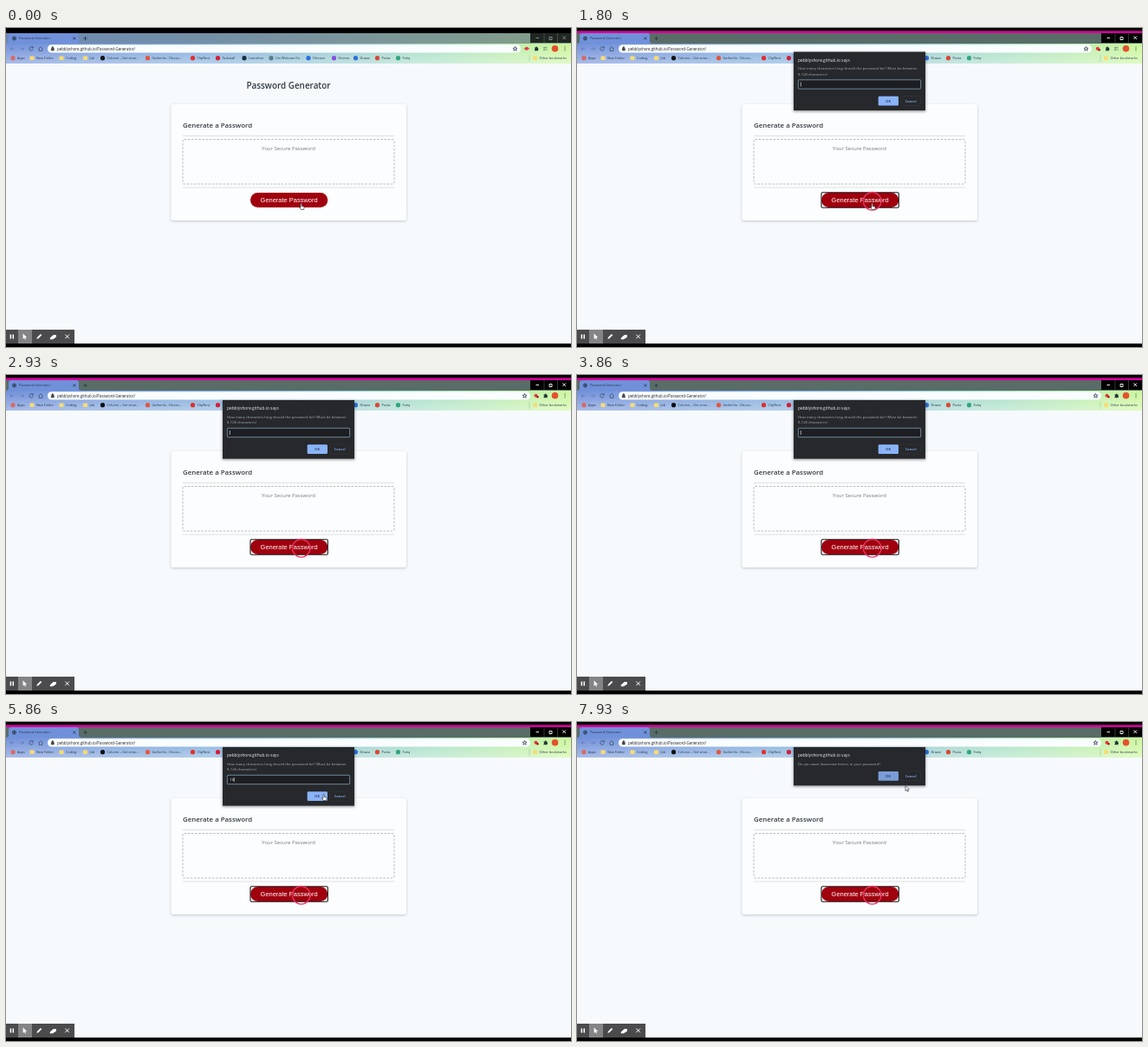
An HTML page that plays this animation: 652x368 px, repeating every 8000 ms.

```html
<!DOCTYPE html>
<html lang="en">
<head>
<meta charset="utf-8">
<title>Password Generator</title>
<style>
  html, body { margin: 0; width: 100%; height: 100%; overflow: hidden; background: #000; }
  svg { display: block; width: 652px; height: 368px; font-family: "Open Sans", "Noto Sans", sans-serif; }
  .mid { text-anchor: middle; }
  .line { fill: none; stroke: #26384a; stroke-width: .8; }
  .pale { fill: none; stroke: #fff; stroke-width: 1; }
  .chrome { font-size: 3.8px; fill: #26394a; }
  .msg { font-size: 4.19px; fill: #a7abb0; }
  .btn { font-size: 4px; font-weight: 600; text-anchor: middle; }
</style>
</head>
<body>
<svg viewBox="0 0 652 368">
  <defs>
    <linearGradient id="theme">
      <stop offset="0" stop-color="#708fda"/><stop offset=".4" stop-color="#84b2dc"/>
      <stop offset=".75" stop-color="#a8e0c6"/><stop offset="1" stop-color="#cdf79c"/>
    </linearGradient>
    <linearGradient id="haze" x2="0" y2="1">
      <stop offset="0" stop-color="#fff" stop-opacity="0"/><stop offset="1" stop-color="#fff" stop-opacity=".4"/>
    </linearGradient>
    <linearGradient id="idle">
      <stop offset="0" stop-color="#6c88b6"/><stop offset=".5" stop-color="#7892a0"/><stop offset="1" stop-color="#829f88"/>
    </linearGradient>
    <filter id="soft" x="-5%" y="-5%" width="110%" height="115%"><feGaussianBlur stdDeviation="1.5"/></filter>
  </defs>

  <!-- browser frame -->
  <rect width="652" height="368"/>
  <rect id="accent" y="3.3" width="652" height="2.7" fill="#d4009a"/>
  <rect id="strip" y="6" width="652" height="12"/>
  <rect y="18" width="652" height="23" fill="url(#theme)"/>
  <rect y="18" width="652" height="23" fill="url(#haze)"/>
  <path d="M0 18Q3 18 3 15V9Q3 6 6 6H81Q84 6 84 9V15Q84 18 87 18Z" fill="#7090da"/>
  <circle cx="9.5" cy="12" r="2" class="line"/><path d="M7.5 12h4M9.5 10v4" class="line" stroke-width=".4"/>
  <text x="15" y="13.4" class="chrome">Password Generator</text>
  <path d="M77.3 10.5l3 3m0-3l-3 3M89.3 12h4.4M91.5 9.8v4.4" class="line"/>
  <g id="controls">
    <rect x="605" y="6" width="47" height="11"/>
    <path d="M621 6v11M636.5 6v11" stroke="#3c4446" stroke-width=".8"/>
    <path id="controlMarks" d="M611.5 11.5h3.5M627 10.5h3v3h-3zM642.5 9.5l3.5 3.5m0-3.5l-3.5 3.5" fill="none" stroke-width=".9"/>
  </g>
  <g class="line" opacity=".75">
    <path d="M9.5 24H5m2-2l-2 2 2 2M16 24h4.5m-2-2l2 2-2 2" opacity=".4"/>
    <path d="M31 22.6a2.3 2.3 0 1 0 .3 2M31.3 21.3v1.8h-1.8M37.5 24l2.5-2.4 2.5 2.4M38.2 23.6v2.9h3.6v-2.9"/>
  </g>
  <rect id="omnibox" x="48" y="19.2" height="9.3" rx="4.6" fill="#fafdff"/>
  <path d="M52.2 23.5h3.2v2.6h-3.2zM52.8 23.5v-1a1 1 0 0 1 2 0v1" fill="#444" stroke="#444" stroke-width=".4"/>
  <text x="59" y="25.5" font-size="4.4" fill="#222">pebblyshore.github.io/Password-Generator/</text>
  <path id="star" d="M0-2.5l.7 1.7 1.8.1-1.4 1.1.5 1.8L0 1.2l-1.6 1 .5-1.8-1.4-1.1 1.8-.1z" class="line" stroke-width=".6"/>
  <g id="recorder"><circle r="2" fill="#e5353f"/><circle id="badge" cx="1.9" cy="1.4" r="1.3" fill="#b3121c"/>
    <path id="dots" d="M-3 0h.8M2.2 0H3" stroke="#e5353f" stroke-width="1.4"/></g>
  <path id="puzzle" d="M-2-1.3h1.2a.9.9 0 0 1 1.8 0h1V0a.9.9 0 0 1 0 1.6v.9h-4V1.3a.8.8 0 0 0 0-1.5z" fill="#24363a"/>
  <path id="playlist" d="M620 22.4h4.5m-4.5 1.6h3m-3 1.6h2m2-1.6v2" class="line" opacity=".6"/>
  <circle cx="633.5" cy="23.8" r="3.8" fill="#e4512b"/>
  <path d="M645 21.4v.9m0 1.1v.9m0 1.1v.9" stroke="#26384a"/>
  <g id="bookmarks" class="chrome"></g>

  <!-- page -->
  <rect y="41" width="652" height="323" fill="#f6fafd"/>
  <text x="326" y="70.2" class="mid" font-size="9.9" font-weight="600" fill="#303a42">Password Generator</text>
  <rect x="190.5" y="89" width="271.5" height="134" rx="2" fill="#9aa5ad" opacity=".6" filter="url(#soft)"/>
  <rect x="190.5" y="88" width="271.5" height="134" rx="2" fill="#fcfdfe"/>
  <text x="204" y="114.6" font-size="7.85" font-weight="600" fill="#303a42">Generate a Password</text>
  <path d="M204 124.5h244M204 184h244" stroke="#dadde0" stroke-width=".9"/>
  <rect x="204" y="128.5" width="244" height="51.5" rx="1.5" fill="none" stroke="#b3bdc4" stroke-width="1" stroke-dasharray="2.6 1.6"/>
  <text x="326" y="140.9" class="mid" font-size="6" fill="#74797d">Your Secure Password</text>
  <rect x="282" y="190" width="89.3" height="17" rx="8.5" fill="#a0000e"/>
  <rect id="focusRing" x="282" y="189.8" width="89.3" height="17.4" rx="1.2" fill="none" stroke="#161616" stroke-width="1.1"/>
  <text x="326.6" y="200.8" class="mid" font-size="7.47" fill="#fff" style="font-family:'Liberation Sans',Arial,sans-serif">Generate Password</text>
  <circle id="clickRing" cx="340.7" cy="199.8" r="10.3" fill="none" stroke="#e8345f" stroke-width="1.3"/>

  <!-- prompt -->
  <g id="dialog">
    <rect id="dialogShade" x="249.5" y="29.5" width="153" fill="#000" opacity=".35" filter="url(#soft)"/>
    <rect id="dialogBox" x="250" y="29" width="152" fill="#26282b"/>
    <text x="255" y="40.2" font-size="4.8" fill="#eceef0">pebblyshore.github.io says</text>
    <text id="message" x="255" y="49.7" class="msg"></text>
    <g id="field">
      <text x="255" y="56.4" class="msg">8-128 characters)</text>
      <rect x="255.3" y="61.3" width="141.4" height="10.4" rx=".8" fill="#1d1e21" stroke="#80a0b8" stroke-width=".8"/>
      <text id="typed" x="258.3" y="68.1" font-size="4.3" fill="#eceef0"></text>
      <path id="caret" d="M0 64v5" stroke="#fff" stroke-width=".6"/>
    </g>
    <g id="buttons">
      <rect id="ok" x="347.7" y="80.2" width="23.3" height="10.8" rx="1.2"/>
      <text x="359.2" y="87" class="btn" fill="#26344c">OK</text>
      <rect x="373.8" y="80.2" width="22.8" height="10.8" rx="1.2" fill="none" stroke="#34373b" stroke-width=".6"/>
      <text x="385.2" y="87" class="btn" fill="#8ab4f8">Cancel</text>
    </g>
  </g>

  <g fill="#fff" stroke="#222" stroke-width=".6">
    <path id="hand" d="M-1 0V-3.5a.7.7 0 0 1 1.4 0V-1l2.2.6q.7.3.5 1.2L2.6 3H-.6L-2.7.4q.2-.9 1.7.4z"/>
    <path id="arrow" d="M0 0V6l1.5-1.3 1 2.2.9-.4-1-2.1h2z"/>
  </g>

  <!-- recording tools -->
  <rect y="348" width="79" height="16" fill="#4b4b4d"/>
  <rect x="14" y="348" width="16" height="16" fill="#848486"/>
  <path d="M5.4 353.4v5M8.3 353.4v5" stroke="#fff" stroke-width="1.5"/>
  <path d="M19.6 352.5v6.2l1.5-1.2 1 2.1 1-.5-1-2h2z" fill="#fff"/>
  <path d="M35.4 358.8l.5-1.9 4-4 1.4 1.4-4 4zM50.8 357.4l4-3.3h3v2.6l-4 2.6h-3z" fill="#fff"/>
  <path d="M68.3 353.6l4.6 4.6m0-4.6l-4.6 4.6" class="pale"/>
</svg>
<script>
const LOOP = 8000, OPEN = 1530, SETTLE = 1930, TYPE_1 = 4460, TYPE_0 = 4630, CONFIRM = 6530;
const $ = id => document.getElementById(id);
const set = (id, attrs) => { for (const k in attrs) $(id).setAttribute(k, attrs[k]); };
const show = (id, on) => set(id, { display: on ? 'inline' : 'none' });
const move = (id, x, y) => set(id, { transform: `translate(${x} ${y})` });

const FOLDER = '#f7dc74';
const bookmarks = [
  [8, 'Apps', '#d96a62'], [30, 'New Folder', FOLDER], [64, 'Coding', FOLDER], [91.5, 'Job', FOLDER],
  [111.5, 'Column – Get smar...', '#111'], [163.5, 'Gatherlio - Discov...', '#e2573f'],
  [215.5, 'ClipNest', '#e02f2f'], [244.5, 'Tackwall', '#d3203a'], [275, 'Learnhive', '#17303a'],
  [306, 'Uni Webcam Fix', '#5b7f8c'], [349, 'Filecove', '#2b6fe0'], [378.5, 'Strema', '#8a4fe0'],
  [403.5, 'Drawo', '#2f6fd8'], [428.5, 'Posta', '#d9483b'], [452.5, 'Fotiq', '#35a482'],
  [610.5, 'Other bookmarks', FOLDER]
];
$('bookmarks').innerHTML = bookmarks.map(([x, label, color]) =>
  (color === FOLDER
    ? `<rect x="${x - 2.5}" y="32.5" width="5" height="4.4" rx=".6" fill="${color}"/>`
    : `<circle cx="${x}" cy="34.7" r="2.6" fill="${color}"/>`) +
  `<text x="${x + 5}" y="36.1">${label}</text>`).join('') +
  '<path d="M604 31v8" stroke="#9cc79a" stroke-width=".6"/>';

// Eased position between two points over [from, to]
function glide(t, from, to, a, b) {
  const p = Math.min(1, Math.max(0, (t - from) / (to - from)));
  const e = p * p * (3 - 2 * p);
  return a.map((v, i) => v + (b[i] - v) * e);
}

function draw(t) {
  const open = t >= OPEN, settled = t >= SETTLE, confirm = t >= CONFIRM;

  show('accent', open);
  set('strip', { fill: open ? '#596c67' : 'url(#idle)' });
  set('controls', { opacity: open ? 1 : .75 });
  set('controlMarks', { stroke: open ? '#fff' : '#8a9294' });
  set('omnibox', { width: settled ? 557 : 546 });
  move('star', settled ? 598.5 : 587.5, 24);
  move('recorder', settled ? 611.5 : 600.8, 23.8);
  move('puzzle', settled ? 622.5 : 612, 23.8);
  show('playlist', !settled);
  show('badge', t >= 1060);
  show('dots', t < 1060);

  show('focusRing', open);
  show('clickRing', t >= OPEN - 70);

  const height = confirm ? 44.3 : 67.6;
  show('dialog', open);
  move('dialog', 0, settled ? 0 : -1.5);
  set('dialogBox', { height });
  set('dialogShade', { height: height + 1 });
  $('message').textContent = confirm
    ? 'Do you want lowercase letters in your password?'
    : 'How many characters long should the password be? (Must be between';
  show('field', !confirm);
  move('buttons', 0, confirm ? -23.3 : 0);
  set('ok', { fill: t >= 7730 ? '#7a9cd8' : '#8ab4f8' });

  const typed = t < TYPE_1 ? '' : t < TYPE_0 ? '1' : '10';
  $('typed').textContent = typed;
  const since = t - (t < TYPE_1 ? OPEN : t < TYPE_0 ? TYPE_1 : TYPE_0);
  show('caret', Math.floor(since / 500) % 2 === 0);
  move('caret', 258.3 + typed.length * 2.45, 0);

  const button = [341, 206.5], okay = [367, 87.5];
  const hand = t < 5460 ? button : glide(t, 5460, 5800, button, okay);
  show('hand', t < 1060 || (t >= 1400 && t < SETTLE) || (t >= 5460 && !confirm));
  move('hand', ...hand);
  show('arrow', confirm);
  move('arrow', ...glide(t, 7730, 7930, [366.5, 84], [379, 73.5]));
}

function tick(now) {
  draw(now % LOOP);
  requestAnimationFrame(tick);
}
draw(0);
requestAnimationFrame(tick);
</script>
</body>
</html>
```
